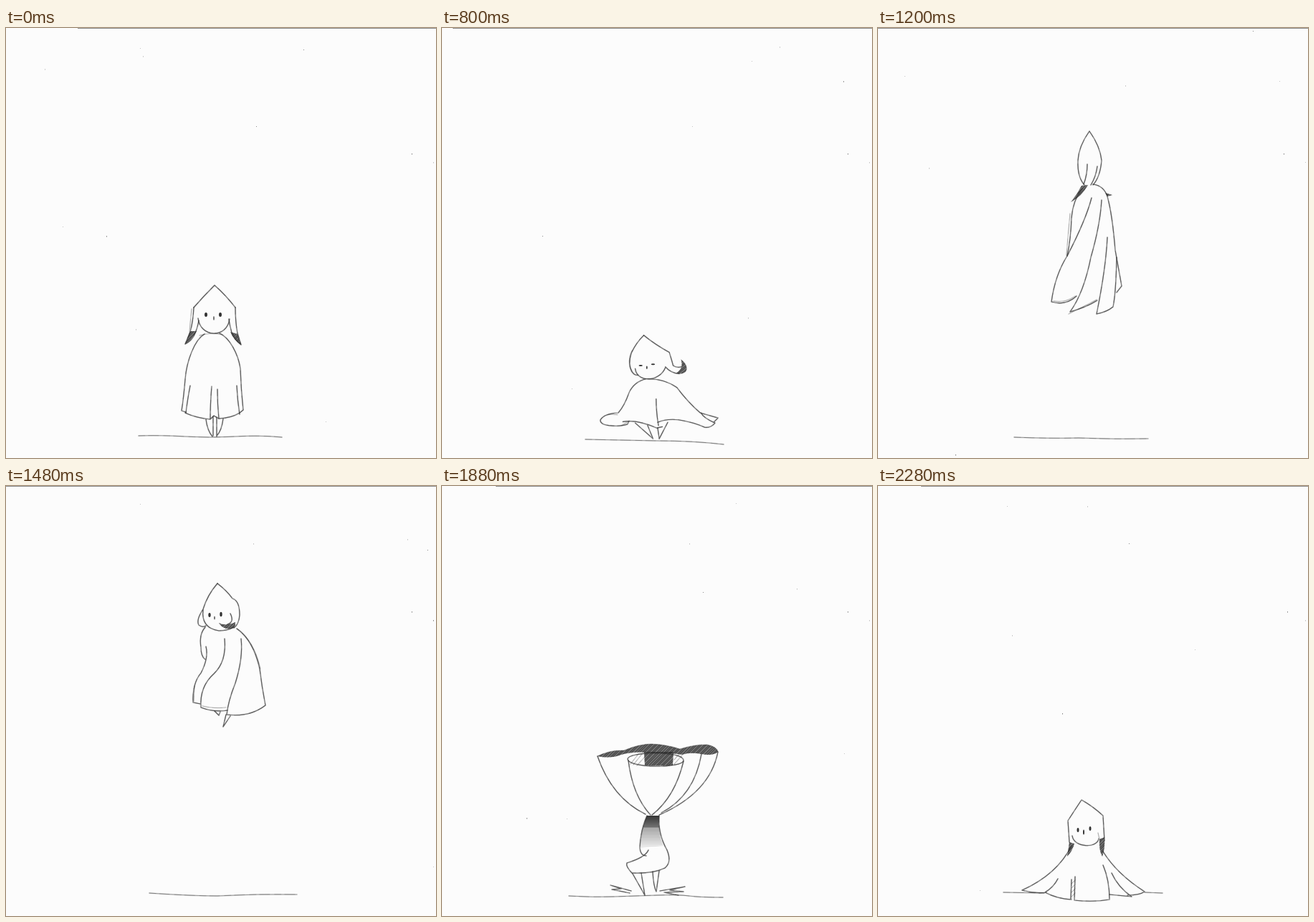
Write an HTML page with a canvas that moves like this. It is 600 px wide and 600 px high and loops after 2360 ms.

```html
<!DOCTYPE html>
<html lang="en">
<head>
<meta charset="utf-8">
<title>Cloak jump</title>
<style>
  html, body { margin: 0; width: 100%; height: 100%; overflow: hidden; background: #fcfcfc; }
  canvas { display: block; width: 600px; height: 600px; }
</style>
</head>
<body>
<canvas id="stage" width="600" height="600"></canvas>
<script>
const LOOP = 2360;
const ctx = document.getElementById('stage').getContext('2d');

const eye = (x, y, rx = 2, ry = 3) =>
  `M${x - rx} ${y}a${rx} ${ry} 0 1 0 ${2 * rx} 0a${rx} ${ry} 0 1 0 ${-2 * rx} 0Z`;

// base: lowest point, used as pivot; lines: pencil strokes; faint: light strokes;
// dark: shaded areas; ink: solid marks
const poses = {
  stand: {
    base: 570, edge: 100,
    ground: 'M185 569Q215 568 250 570T320 570T385 571',
    lines: [
      'M262 390Q275 375 291 359Q306 372 320 390',
      'M262 390Q261 410 257 424L250 441Q258 437 262 430Q267 420 269 408',
      'M320 390Q320 410 323 426L328 442Q319 435 315 425Q312 415 311 406',
      'M268 405C271 432 308 434 312 406',
      'M277 427C263 435 252 465 250 490Q248 515 245 534L251 536',
      'M250 537Q265 544 285 546Q285 525 287 500M295 504Q295 525 297 545Q315 544 326 537L331 533Q328 505 327 475C324 455 312 432 298 426',
      'M257 499Q253 520 251 537M322 499Q323 520 326 539M286 545L290 541L297 545',
      'M279 546Q281 562 288 570M289 542V569M294 543V570M303 545Q301 562 294 569'
    ],
    faint: ['M270 429Q287 424 302 428', 'M259 392Q257 412 256 424'],
    dark: ['M257 423L266 423Q260 434 250 441Z', 'M313 424L323 427L328 442Q318 436 313 424Z'],
    ink: [eye(279, 400), eye(299, 400), eye(290, 405, .7, 3)],
    dust: [[566, 175], [187, 28], [191, 39], [415, 30], [54, 57], [79, 277], [140, 290], [446, 549], [181, 420], [349, 137]]
  },
  dip: {
    base: 574, edge: 15,
    ground: 'M200 574L300 576Q350 576 393 581',
    lines: [
      'M285 409Q275 421 269 437Q264 455 270 467Q273 473 278 472',
      'M285 409Q300 424 318 436Q322 452 323 457Q328 461 333 459',
      'M313 459Q320 469 331 470M274 462C276 484 305 484 313 460',
      'M288 478Q272 483 266 500Q260 521 252 532Q234 533 229 543Q228 550 240 552Q255 554 264 550L266 545',
      'M290 478Q312 478 328 492Q342 515 358 532L381 540L376 546',
      'M359 532Q362 540 377 548Q372 556 364 555Q350 547 330 543Q314 541 303 547',
      'M301 510Q301 530 304 552M258 546Q276 542 302 556L309 554',
      'M274 548L297 573L290 552M303 556L305 573L316 547'
    ],
    faint: ['M234 537Q240 533 251 535', 'M270 433Q263 449 269 467', 'M256 552L265 546'],
    dark: ['M333 447Q344 458 339 467Q334 472 327 469Q337 461 333 447Z'],
    ink: [eye(281, 457, 2.5, 1.2), eye(297, 455, 2.5, 1.2), eye(289, 460, .8, 2.6)],
    dust: [[566, 175], [432, 46], [471, 26], [140, 290], [427, 404], [181, 503], [560, 74], [349, 137]]
  },
  turn: {
    base: 578, edge: 15,
    ground: 'M183 570L232 571M334 573Q380 574 433 573',
    lines: [
      'M268 456Q261 446 259 433Q262 415 268 399Q290 405 307 414Q314 435 323 441',
      'M261 442C266 470 302 473 310 447M302 437Q308 448 320 447',
      'M273 461Q258 470 254 495Q250 530 243 540Q236 557 224 563Q240 571 265 573',
      'M243 540Q233 552 225 552L229 558L237 554',
      'M305 457Q325 468 333 490Q342 530 359 567Q345 572 334 570',
      'M279 518Q277 550 265 574Q280 582 305 582L330 578Q333 574 333 560Q334 530 330 504',
      'M268 447L274 445M284 442L290 438M279 444L281 450'
    ],
    faint: ['M270 400Q291 405 309 413', 'M335 490Q344 530 357 566', 'M246 540Q240 556 228 564'],
    dark: ['M321 439Q338 446 333 466Q326 454 315 449Q320 446 321 439Z'],
    ink: [],
    dust: [[566, 175], [345, 80], [122, 318], [508, 223], [540, 494], [561, 4], [559, 74], [210, 518]]
  },
  back: {
    base: 398, edge: 0,
    ground: 'M190 571Q240 573 280 572Q330 574 377 573',
    lines: [
      'M295 144Q280 165 279 185Q278 208 288 219M295 144Q310 165 312 185Q310 208 300 219',
      'M292 190Q292 205 287 218M306 193Q304 208 297 219',
      'M300 218Q315 220 320 235Q327 260 331 310L340 360L333 369',
      'M285 224Q272 240 270 265Q269 295 264 318Q247 345 242 382Q262 388 277 374',
      'M298 237Q290 268 264 318M312 240Q310 275 297 320Q287 370 268 396Q290 390 306 380',
      'M320 292Q318 335 305 399Q320 396 328 389Q332 370 333 320'
    ],
    faint: ['M268 259Q265 290 263 317', 'M245 381Q262 384 275 374', 'M266 399Q290 387 305 379'],
    dark: ['M284 220L293 219Q285 234 269 243Q278 232 284 220Z', 'M317 230L327 233L320 235Z'],
    ink: [],
    dust: [[566, 175], [37, 67], [345, 80], [523, 4], [71, 195], [560, 74], [108, 595]]
  },
  float: {
    base: 336, edge: 0,
    ground: 'M200 568Q260 572 295 572Q350 569 406 570',
    lines: [
      'M295 136Q308 146 316 157Q326 160 326 180Q325 193 318 198',
      'M295 136Q281 152 275 172Q265 187 269 194Q274 198 279 195',
      'M275 173Q272 198 297 202Q309 202 318 197M313 178Q319 190 309 193',
      'M278 197Q269 207 272 225Q272 238 278 242',
      'M279 224Q283 240 272 261Q260 275 261 302L271 304',
      'M305 213Q308 245 290 262Q270 280 272 309Q290 316 309 313',
      'M328 213Q331 240 320 275Q310 300 308 319Q340 323 362 306Q357 280 354 255Q345 215 322 199',
      'M307 319L303 336L313 321M291 314L297 320L299 315'
    ],
    faint: ['M263 279L262 301', 'M324 200Q347 218 355 255', 'M274 307Q290 311 307 309'],
    dark: ['M297 191Q306 196 320 190Q321 198 314 199Q303 201 297 191Z'],
    ink: [eye(284, 180, 1.7, 3), eye(300, 179, 1.7, 3.2), eye(291, 184, .7, 2.5)],
    dust: [[566, 175], [187, 25], [345, 80], [588, 89], [560, 74], [596, 531]]
  },
  land: {
    base: 571, edge: 75,
    ground: 'M177 572Q210 574 240 573T300 571T345 572T392 574',
    lines: [
      'M217 377Q237 435 284 458M260 383Q266 432 291 459',
      'M337 384Q325 434 293 459M362 374Q352 432 306 456M385 371Q374 428 303 459',
      'M259 381C260 370 337 369 337 383C336 394 260 394 259 381',
      'M286 460Q277 480 276 505Q277 516 285 516',
      'M303 460Q301 485 314 508Q321 525 311 533Q295 541 266 540',
      'M288 508Q284 518 258 526Q256 531 266 541L283 571L278 540',
      'M294 538Q295 558 299 566L303 537'
    ],
    faint: [
      'M217 377Q235 368 254 369Q275 360 293 360Q314 361 332 367Q355 360 370 361Q384 364 385 371',
      'M263 388L274 374M267 389L279 374M272 390L283 378M324 388L335 376M324 382L331 374'
    ],
    dark: [
      'M217 377Q235 368 254 369Q275 360 293 360Q314 361 332 367Q355 360 370 361Q384 364 385 371Q378 377 362 374Q345 371 335 375Q320 372 290 372Q265 370 250 375Q235 381 217 377Z',
      'M282 371L323 371L322 390L283 390Z'
    ],
    fade: 'M286 460L303 460Q301 485 309 502L277 505Q277 480 286 460Z',
    splash: 'M264 565L235 557L250 562L237 563L262 568M304 565L339 559L318 564L337 566L310 567L330 571',
    ink: [],
    dust: [[566, 175], [410, 24], [345, 80], [364, 148], [495, 143], [561, 373], [118, 463], [174, 464]]
  },
  settle: {
    base: 578, edge: 60,
    ground: 'M175 567L232 568M372 567L397 568',
    lines: [
      'M267 497L265 467Q274 453 284 438Q300 447 314 460L316 495',
      'M271 488C273 505 306 506 308 492',
      'M270 502Q250 542 201 564Q218 569 235 567M251 548Q245 560 233 567Q250 576 270 577',
      'M270 549L269 576M275 545L274 578Q300 581 323 577Q323 550 314 529',
      'M326 540Q335 560 354 573L323 570M314 510Q333 541 372 566Q365 571 348 571'
    ],
    faint: ['M270 555L275 550M270 561L275 556M270 567L275 562M270 573L275 568', 'M307 484L309 493'],
    dark: ['M267 497L274 499Q271 510 264 517Z', 'M309 493L316 490Q317 506 313 517Q308 508 309 493Z'],
    ink: [eye(279, 480, 1.5, 3), eye(296, 478, 1.5, 3), eye(287, 483, 1, 3.6)],
    dust: [[571, 175], [180, 28], [292, 28], [350, 80], [187, 208], [442, 228], [257, 317], [142, 564]]
  }
};

// start ms, pose, shift x, shift y, scale x, scale y, splash
const steps = [
  [0, 'stand'],
  [680, 'dip'],
  [800, 'dip', -3, 0, 1.08, .88],
  [920, 'turn', 0, 0, 1.08, .9],
  [1000, 'turn'],
  [1080, 'back', 0, 120, .94, 1.1],
  [1200, 'back'],
  [1280, 'back', 0, -30, 1.04, .96],
  [1400, 'float', 0, -22, .92, 1.02],
  [1480, 'float'],
  [1600, 'float', 0, 60, .96, 1.06],
  [1720, 'land', 0, -150, .8, 1.06],
  [1800, 'land', 0, -50, .9, 1.08],
  [1880, 'land', 0, 0, 1, 1, true],
  [2000, 'land', 0, 0, 1.1, .86, true],
  [2080, 'settle', 0, 0, 1.16, .84],
  [2200, 'settle', 0, 0, 1.06, .93],
  [2280, 'settle']
];

function pencil(d, matrix, alpha = 1, width = 1.15) {
  const path = new Path2D();
  path.addPath(new Path2D(d), matrix);
  const pass = (w, a, dash) => {
    ctx.lineWidth = w;
    ctx.strokeStyle = `rgba(45,45,45,${a * alpha})`;
    ctx.setLineDash(dash);
    ctx.stroke(path);
  };
  pass(width + 1, .14, []);
  pass(width, .6, []);
  pass(width, .35, [9, 5, 14, 7]);
  ctx.setLineDash([]);
}

function inside(d, matrix, draw) {
  ctx.save();
  ctx.setTransform(matrix);
  ctx.clip(new Path2D(d));
  draw();
  ctx.restore();
}

function hatch() {
  ctx.fillStyle = 'rgba(50,50,50,.66)';
  ctx.fillRect(0, 0, 600, 600);
  ctx.strokeStyle = 'rgba(25,25,25,.5)';
  ctx.lineWidth = 1.3;
  ctx.beginPath();
  for (let x = 0; x < 1200; x += 3.5 + Math.sin(x)) {
    ctx.moveTo(x, 0);
    ctx.lineTo(x - 600, 600);
  }
  ctx.stroke();
}

function fadeDown() {
  for (let y = 460; y < 507; y += 2) {
    ctx.fillStyle = `rgba(40,40,40,${.92 * (1 - (y - 460) / 50)})`;
    ctx.fillRect(270, y, 45, y < 476 ? 2 : 1.3);
  }
}

function paper({ edge, dust }) {
  ctx.fillStyle = '#fcfcfc';
  ctx.fillRect(0, 0, 600, 600);
  ctx.fillStyle = '#8c8c8c';
  ctx.fillRect(edge, 0, 600 - edge, 1);
  [...dust, [596, 187]].forEach(([x, y], i) => {
    ctx.fillStyle = i % 3 ? '#c4c4c4' : '#888';
    ctx.fillRect(x, y, 1, i % 2 ? 1 : 1.6);
  });
}

function show([, name, dx = 0, dy = 0, sx = 1, sy = 1, splash]) {
  const pose = poses[name];
  const still = new DOMMatrix();
  const move = new DOMMatrix()
    .translate(291 + dx, pose.base + dy).scale(sx, sy).translate(-291, -pose.base);
  paper(pose);
  pencil(pose.ground, still, .8, .9);
  pose.dark.forEach(d => inside(d, move, hatch));
  if (pose.fade) inside(pose.fade, move, fadeDown);
  pose.faint.forEach(d => pencil(d, move, .45, .9));
  pose.lines.forEach(d => pencil(d, move));
  if (splash) pencil(pose.splash, still);
  ctx.save();
  ctx.setTransform(move);
  ctx.fillStyle = '#333';
  pose.ink.forEach(d => ctx.fill(new Path2D(d)));
  ctx.restore();
}

ctx.lineCap = ctx.lineJoin = 'round';
let shown;
function tick() {
  const t = performance.now() % LOOP;
  const step = steps.findLast(s => s[0] <= t);
  if (step !== shown) show(shown = step);
  requestAnimationFrame(tick);
}
tick();
</script>
</body>
</html>
```
